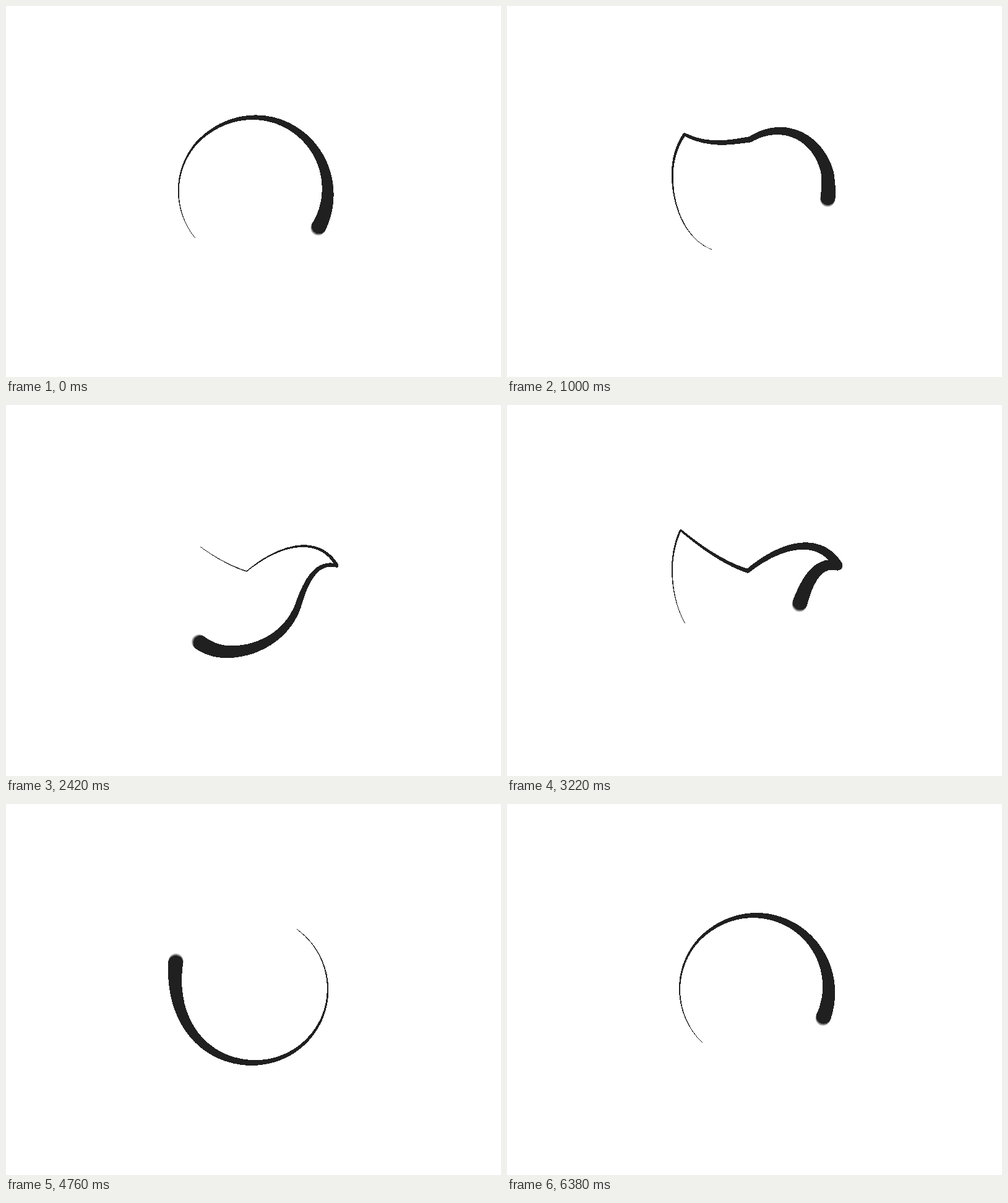
These frames come from a looping animation (800 px wide and 600 px high, 6.4 s). An HTML page with a canvas:

```html
<!DOCTYPE html>
<html lang="en">
<head>
<meta charset="utf-8">
<title>Circle and bird stroke</title>
<style>
  html, body { margin: 0; width: 100%; height: 100%; overflow: hidden; background: #fff; }
  canvas { display: block; }
</style>
</head>
<body>
<canvas id="stage" width="800" height="600"></canvas>
<script>
const ctx = document.getElementById('stage').getContext('2d', { willReadFrequently: true });

const LOOP = 6400, STEP = 20, TURNS = 6;
const CX = 400, CY = 300, RING = 120;
const PEN = 12;            // radius of the stroke at its head
const TAIL = 249;          // visible length, in degrees
const MORPH_LEAD = 1950;   // ms by which a full turn of tail morphs ahead of the head
const INK = '#202020';
const RES = 4;             // outline samples per degree

// Bird outline: cubic curves, each spanning a range of degrees.
const birdStart = { deg: 219, x: 279.5, y: 201.5 };
const birdCurves = [
  // end degree, control 1, control 2, end point
  [268, 318, 235.5, 354.7, 258, 389, 269],
  [345, 440, 226, 505, 208, 535, 260],
  [395, 502, 251, 485, 285, 473.5, 320],
  [463, 459, 367, 413, 399, 360, 399],
  [545, 300, 399, 265.5, 338, 265.5, 265],
  [579, 265.5, 243, 270, 222, 279.5, 201.5]
];

function cubic(a, b, c, d, t) {
  const s = 1 - t;
  return s * s * s * a + 3 * s * s * t * b + 3 * s * t * t * c + t * t * t * d;
}

// Spreads each curve evenly by length over its degrees.
function buildBird() {
  const table = new Array(360 * RES);
  let { deg, x, y } = birdStart;
  for (const [end, x1, y1, x2, y2, x3, y3] of birdCurves) {
    const pts = [], N = 200;
    let len = 0;
    for (let i = 0; i <= N; i++) {
      const p = { x: cubic(x, x1, x2, x3, i / N), y: cubic(y, y1, y2, y3, i / N) };
      if (i) len += Math.hypot(p.x - pts[i - 1].x, p.y - pts[i - 1].y);
      p.len = len;
      pts.push(p);
    }
    const count = (end - deg) * RES;
    for (let k = 0, i = 1; k < count; k++) {
      const want = len * k / count;
      while (pts[i].len < want) i++;
      const a = pts[i - 1], b = pts[i], f = (want - a.len) / (b.len - a.len);
      table[(deg * RES + k) % table.length] = [a.x + (b.x - a.x) * f, a.y + (b.y - a.y) * f];
    }
    deg = end; x = x3; y = y3;
  }
  return table;
}

const bird = buildBird();

function birdAt(deg) {
  const n = bird.length;
  const u = ((deg * RES) % n + n) % n;
  const i = Math.floor(u), f = u - i;
  const a = bird[i % n], b = bird[(i + 1) % n];
  return [a[0] + (b[0] - a[0]) * f, a[1] + (b[1] - a[1]) * f];
}

// 0 is the circle, 1 is the bird.
function morph(ms) {
  const p = 0.5 - 0.5 * Math.cos(ms / LOOP * 2 * Math.PI);
  return p < 0.5 ? 4 * p ** 3 : 1 - 4 * (1 - p) ** 3;
}

function pointAt(head, lag, t) {
  const deg = head - lag, a = deg * Math.PI / 180;
  const m = morph(t + lag / 360 * MORPH_LEAD);
  const b = birdAt(deg);
  const x = CX + RING * Math.cos(a), y = CY + RING * Math.sin(a);
  return { x: x + (b[0] - x) * m, y: y + (b[1] - y) * m, r: PEN * (1 - Math.max(lag, 0) / 360) ** 3 };
}

function addDisc(p) {
  ctx.moveTo(p.x + p.r, p.y);
  ctx.arc(p.x, p.y, p.r, 0, 2 * Math.PI, true);
  ctx.closePath();
}

function addLink(a, b) {
  const dx = b.x - a.x, dy = b.y - a.y, d = Math.hypot(dx, dy) || 1;
  const nx = -dy / d, ny = dx / d;
  ctx.moveTo(a.x + nx * a.r, a.y + ny * a.r);
  ctx.lineTo(b.x + nx * b.r, b.y + ny * b.r);
  ctx.lineTo(b.x - nx * b.r, b.y - ny * b.r);
  ctx.lineTo(a.x - nx * a.r, a.y - ny * a.r);
  ctx.closePath();
}

// Gives the stroke hard, stepped edges.
function harden() {
  const x = 240, y = 150, img = ctx.getImageData(x, y, 320, 300), d = img.data;
  for (let i = 3; i < d.length; i += 4) {
    const on = d[i] > 115;
    d[i - 3] = d[i - 2] = d[i - 1] = on ? 32 : 0;
    d[i] = on ? 255 : 0;
  }
  ctx.putImageData(img, x, y);
}

function draw(t) {
  const head = 28 + t / LOOP * 360 * TURNS;
  ctx.clearRect(0, 0, 800, 600);
  ctx.fillStyle = INK;

  ctx.beginPath();
  let prev = pointAt(head, 0, t);
  addDisc(prev);
  for (let lag = 0.5; lag <= TAIL; lag += 0.5) {
    const p = pointAt(head, lag, t);
    addLink(prev, p);
    addDisc(p);
    prev = p;
  }
  ctx.fill();
  harden();

  // Soft blur in front of the head
  ctx.globalCompositeOperation = 'destination-over';
  ctx.globalAlpha = 0.3;
  for (let lead = 0.5; lead <= 1.5; lead += 0.5) {
    ctx.beginPath();
    addDisc(pointAt(head, -lead, t));
    ctx.fill();
  }
  ctx.globalAlpha = 1;
  ctx.globalCompositeOperation = 'source-over';
}

const start = performance.now();
function tick() {
  const t = (performance.now() - start) % LOOP;
  draw(Math.floor(t / STEP) * STEP);
  requestAnimationFrame(tick);
}
tick();
</script>
</body>
</html>
```
